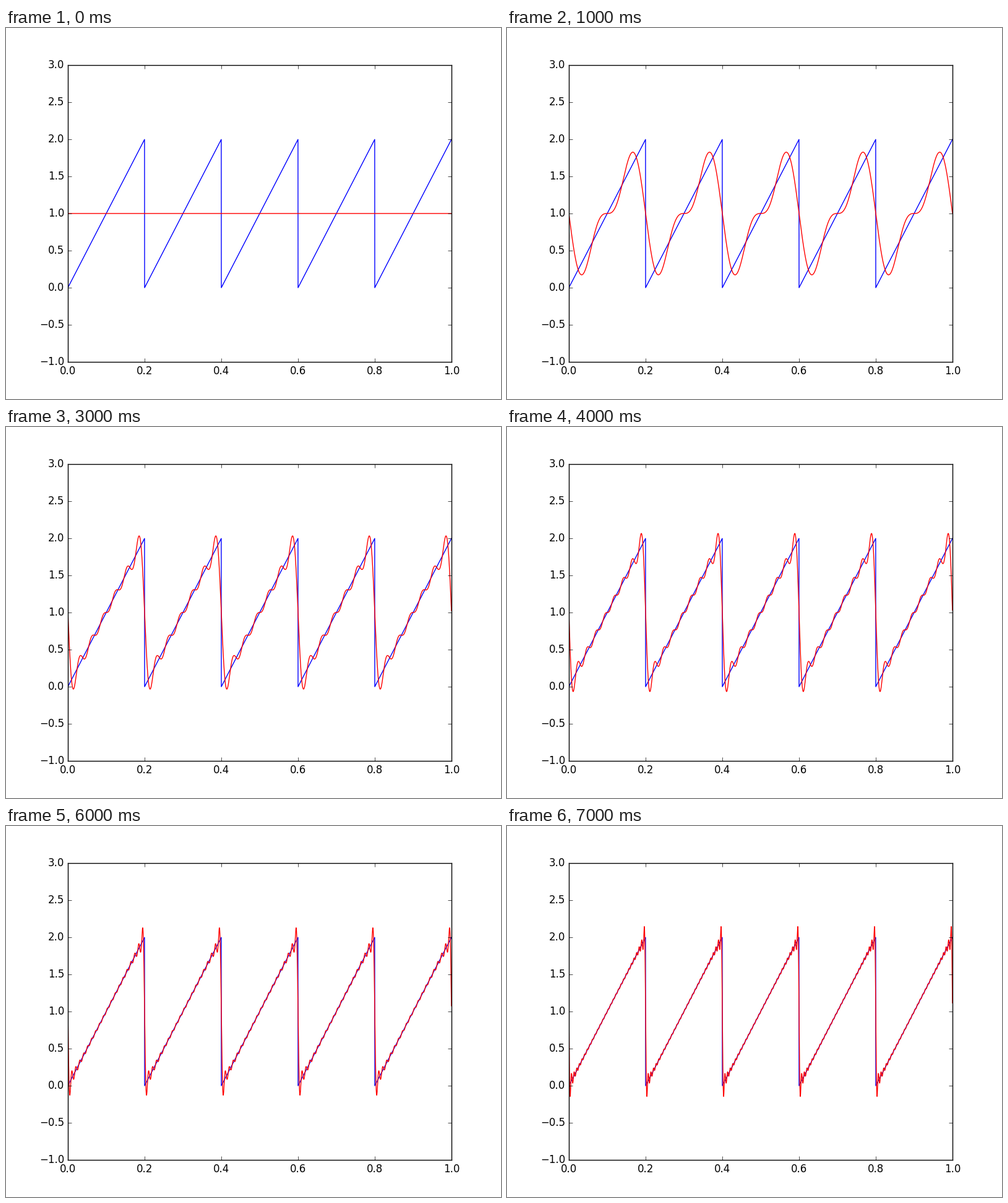
Animation, 800 px wide and 600 px high, one loop 8000 ms. Source, as a matplotlib script:

```python
import numpy as np
import matplotlib.pyplot as plt
from matplotlib.animation import FuncAnimation

plt.style.use("classic")
plt.rcParams["font.family"] = "DejaVu Sans"

SAMPLES = 5000
PERIODS = 5
HARMONICS = [0, 2, 4, 6, 8, 9, 19, 29]

step = np.arange(SAMPLES)
t = step / SAMPLES
per_period = SAMPLES // PERIODS
sawtooth = 2 * (step % per_period) / per_period


def fourier_sum(count):
    """Partial Fourier series of the sawtooth with `count` harmonics."""
    total = np.ones(SAMPLES)
    for k in range(1, count + 1):
        total -= 2 / (np.pi * k) * np.sin(2 * np.pi * k * PERIODS * t)
    return total


fig = plt.figure(figsize=(8, 6), dpi=100, facecolor="white")
ax = fig.add_subplot(111)
ax.plot(t, sawtooth, color="#0000ff", lw=1)
series, = ax.plot(t, fourier_sum(0), color="#ff0000", lw=1)
ax.set_xlim(0, 1)
ax.set_ylim(-1, 3)
ax.set_xticks(np.linspace(0, 1, 6))
ax.set_yticks(np.linspace(-1, 3, 9))


def update(frame):
    series.set_ydata(fourier_sum(HARMONICS[frame]))
    return series,


anim = FuncAnimation(fig, update, frames=len(HARMONICS), interval=1000,
                     repeat=True, repeat_delay=0, blit=False)

plt.show()
```
